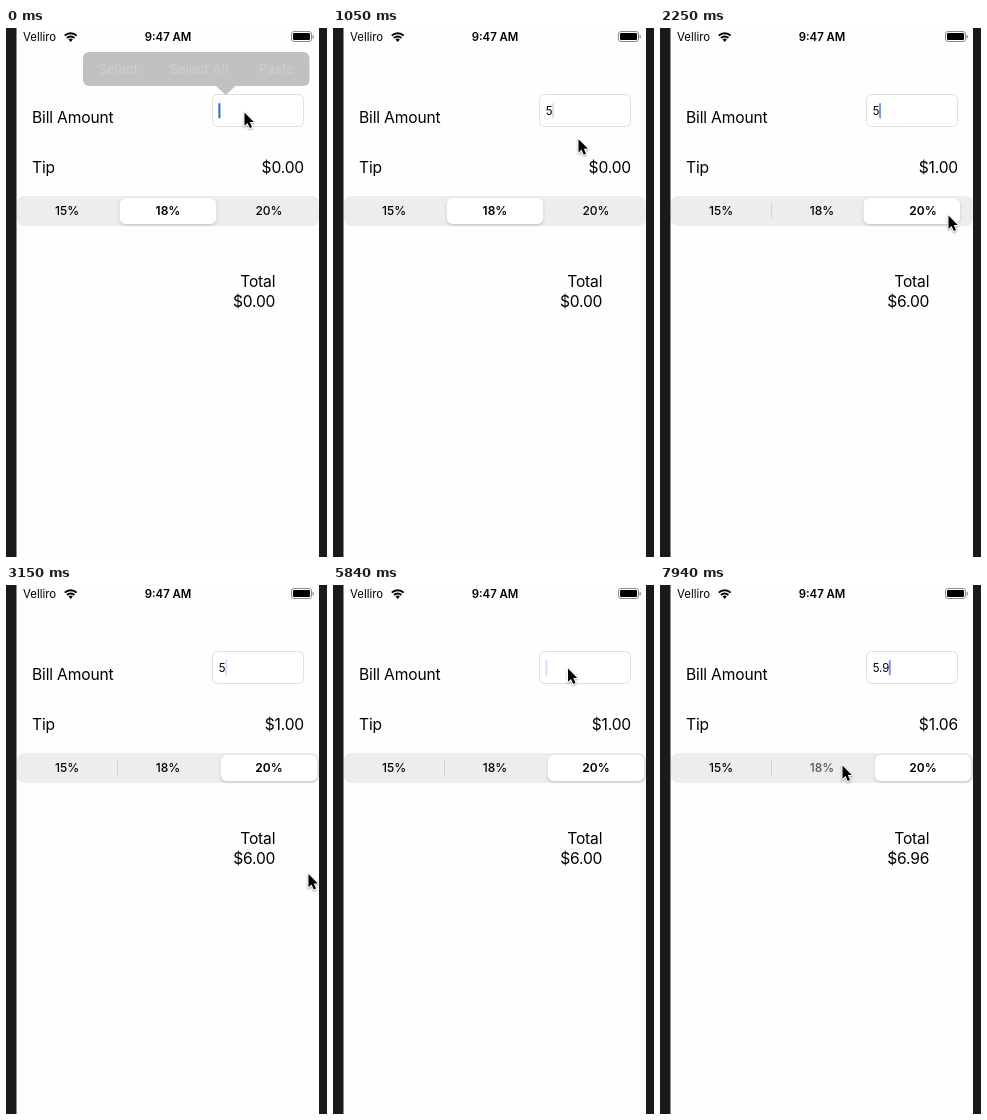
An HTML page with a canvas for the animation above (8000 ms loop, 321 by 529 pixels).

```html
<!DOCTYPE html>
<html lang="en">
<head>
<meta charset="utf-8">
<title>Tip calculator</title>
<style>
html, body { margin: 0; width: 100%; height: 100%; overflow: hidden; background: #fff; }
canvas { display: block; width: 321px; height: 529px; }
</style>
</head>
<body>
<canvas id="stage"></canvas>
<script>
const W = 321, H = 529, LOOP = 8000, STEP = 150;
const FIRST_TAP = 1950, SECOND_TAP = 7940;
const canvas = document.getElementById('stage');
const ctx = canvas.getContext('2d');
const dpr = window.devicePixelRatio || 1;
canvas.width = W * dpr;
canvas.height = H * dpr;

const arrow = new Path2D('M0 0V13.2L3 10.4L5.3 15.6L7.5 14.6L5.3 9.6L9.3 9.4Z');

// Resting places of the pointer and the curved moves between them
const field = [234.5, 83], segment20 = [288, 187], aside = [302, 288.5], segment18 = [182, 180];
const moves = [
  { start: 750, end: 1800, path: [[238, 84], [245, 100], [254, 183], segment20] },
  { start: 2700, end: 3150, path: [segment20, [290, 205], [300, 265], aside] },
  { start: 3150, end: 4250, path: [aside, [235, 330], [98, 120], field] },
  { start: 7190, end: 7940, path: [field, [230, 95], [185, 170], segment18] }
];

// Each edit or tap in the field makes the caret solid again
const edits = [
  { at: 0, value: '' },
  { at: 300, value: '5' },
  { at: 4340, value: '5' },
  { at: 5090, value: '' },
  { at: 6140, value: '5' },
  { at: 6440, value: '5.' },
  { at: 7040, value: '5.9' }
];

const clamp = k => Math.min(1, Math.max(0, k));

function bezier([a, b, c, d], k) {
  const j = 1 - k;
  return [0, 1].map(i => j * j * j * a[i] + 3 * j * j * k * b[i] + 3 * j * k * k * c[i] + k * k * k * d[i]);
}

function pointerAt(t) {
  const move = moves.findLast(m => m.start <= t) || moves[0];
  return bezier(move.path, clamp((t - move.start) / (move.end - move.start)));
}

// Solid for 600 ms, then a 450 ms dip
function caretAlpha(age) {
  const dip = (age + 10) % 1050 - 600;
  return dip < 0 ? 1 : 0.2 + 0.45 * Math.abs(Math.floor(dip / STEP) - 1);
}

function rect(x, y, w, h, r, fill) {
  ctx.beginPath();
  ctx.roundRect(x, y, w, h, r);
  ctx.fillStyle = fill;
  ctx.fill();
}

function outline(x, y, w, h, r, color) {
  ctx.beginPath();
  ctx.roundRect(x, y, w, h, r);
  ctx.lineWidth = 1;
  ctx.strokeStyle = color;
  ctx.stroke();
}

function text(str, x, y, size, { weight = 400, align = 'left', color = '#000', spacing = 0 } = {}) {
  ctx.font = `${weight} ${size}px Inter, "Liberation Sans", sans-serif`;
  ctx.letterSpacing = spacing + 'px';
  ctx.textAlign = align;
  ctx.fillStyle = color;
  ctx.fillText(str, x, y);
  return ctx.measureText(str).width;
}

const label = (str, x, y, align) => text(str, x, y, 15.6, { align, spacing: -0.16 });

function statusBar() {
  text('Velliro', 17, 13, 11.4);
  text('9:47 AM', 162, 13, 11.4, { weight: 600, align: 'center' });
  const arc = r => ctx.arc(64.7, 13.6, r, -Math.PI * 0.75, -Math.PI * 0.25);
  ctx.strokeStyle = ctx.fillStyle = '#000';
  ctx.lineWidth = 2;
  for (const r of [5.2, 8.4]) {
    ctx.beginPath();
    arc(r);
    ctx.stroke();
  }
  ctx.beginPath();
  ctx.moveTo(64.7, 14);
  arc(3);
  ctx.fill();
  outline(285.5, 3.5, 20, 10, 2.5, '#8a8a8a');
  rect(287, 5, 17, 7, 1.3, '#000');
  rect(306.5, 7, 1.3, 3.5, 0.7, '#8a8a8a');
}

function editMenu() {
  rect(77, 24, 226.5, 34, 6, '#c1c1c1');
  ctx.fill(new Path2D('M210 58L219.7 67L229.5 58Z'));
  const item = (str, x) => text(str, x, 46, 13, { align: 'center', color: '#cecece', spacing: 0.2 });
  item('Select', 112.5);
  item('Select All', 193);
  item('Paste', 270.5);
}

function amountField(t) {
  const { at, value } = edits.findLast(e => e.at <= t);
  rect(206.5, 66.5, 91, 32, 5, '#fff');
  outline(206.5, 66.5, 91, 32, 5, '#dfdfdf');
  const end = text(value, 212.7, 87, 11.4, { spacing: -0.1 });
  ctx.globalAlpha = caretAlpha(t - at);
  rect(212.4 + end, 75, 2, 15.5, 1, '#3560e4');
  ctx.globalAlpha = 1;
}

function segments(t) {
  const slide = 1 - (1 - clamp((t - FIRST_TAP) / 450)) ** 2;
  const selected = slide ? 2 : 1;
  const pressed = t === SECOND_TAP ? 1 : t === FIRST_TAP ? 2 : -1;
  rect(11, 168, 302, 30, 7, '#ededed');
  ctx.globalAlpha = slide;
  rect(111, 175, 1, 16, 0, '#d2d2d2');
  ctx.globalAlpha = 1;
  ctx.save();
  ctx.shadowColor = 'rgba(0,0,0,0.2)';
  ctx.shadowBlur = 3 * dpr;
  ctx.shadowOffsetY = dpr;
  rect(113.7 + 101 * slide, 170, 96.6, 26, 6, '#fff');
  ctx.restore();
  ['15%', '18%', '20%'].forEach((str, i) => text(str, 61 + 101 * i, 187, 12, {
    weight: i === selected ? 600 : 500,
    align: 'center',
    color: i === pressed ? '#555' : '#000'
  }));
}

function pointer([x, y]) {
  ctx.save();
  ctx.translate(x + 0.5, y + 0.5);
  ctx.lineJoin = 'round';
  ctx.lineWidth = 2;
  ctx.strokeStyle = '#fff';
  ctx.shadowColor = 'rgba(0,0,0,0.35)';
  ctx.shadowBlur = 2 * dpr;
  ctx.shadowOffsetY = dpr;
  ctx.stroke(arrow);
  ctx.shadowColor = 'transparent';
  ctx.fillStyle = '#000';
  ctx.fill(arrow);
  ctx.restore();
}

function results(t) {
  const bill = t < FIRST_TAP ? 0 : t < SECOND_TAP ? 5 : 5.9;
  const tip = bill * (t < SECOND_TAP ? 0.2 : 0.18);
  const money = n => '$' + n.toFixed(2);
  label('Bill Amount', 26, 94.5);
  label('Tip', 26, 144.5);
  label(money(tip), 298, 144.5, 'right');
  label('Total', 269.3, 259, 'right');
  label(money(bill + tip), 269.3, 279, 'right');
}

function draw(t) {
  ctx.setTransform(dpr, 0, 0, dpr, 0, 0);
  rect(0, 0, W, H, 0, '#1c1a19');
  rect(10, 0, 1, H, 0, '#8c8b8a');
  rect(11, 0, 302, H, 0, '#fefefe');
  statusBar();
  results(t);
  segments(t);
  amountField(t);
  if (t < STEP) editMenu();
  pointer(pointerAt(t));
}

// The picture advances in steps; the one before 3290 ms is 10 ms short
function snap(t) {
  const base = t < 3290 ? 0 : 3290;
  return base + Math.floor((t - base) / STEP) * STEP;
}

const start = performance.now();
function tick() {
  draw(snap((performance.now() - start) % LOOP));
  requestAnimationFrame(tick);
}
tick();
</script>
</body>
</html>
```
